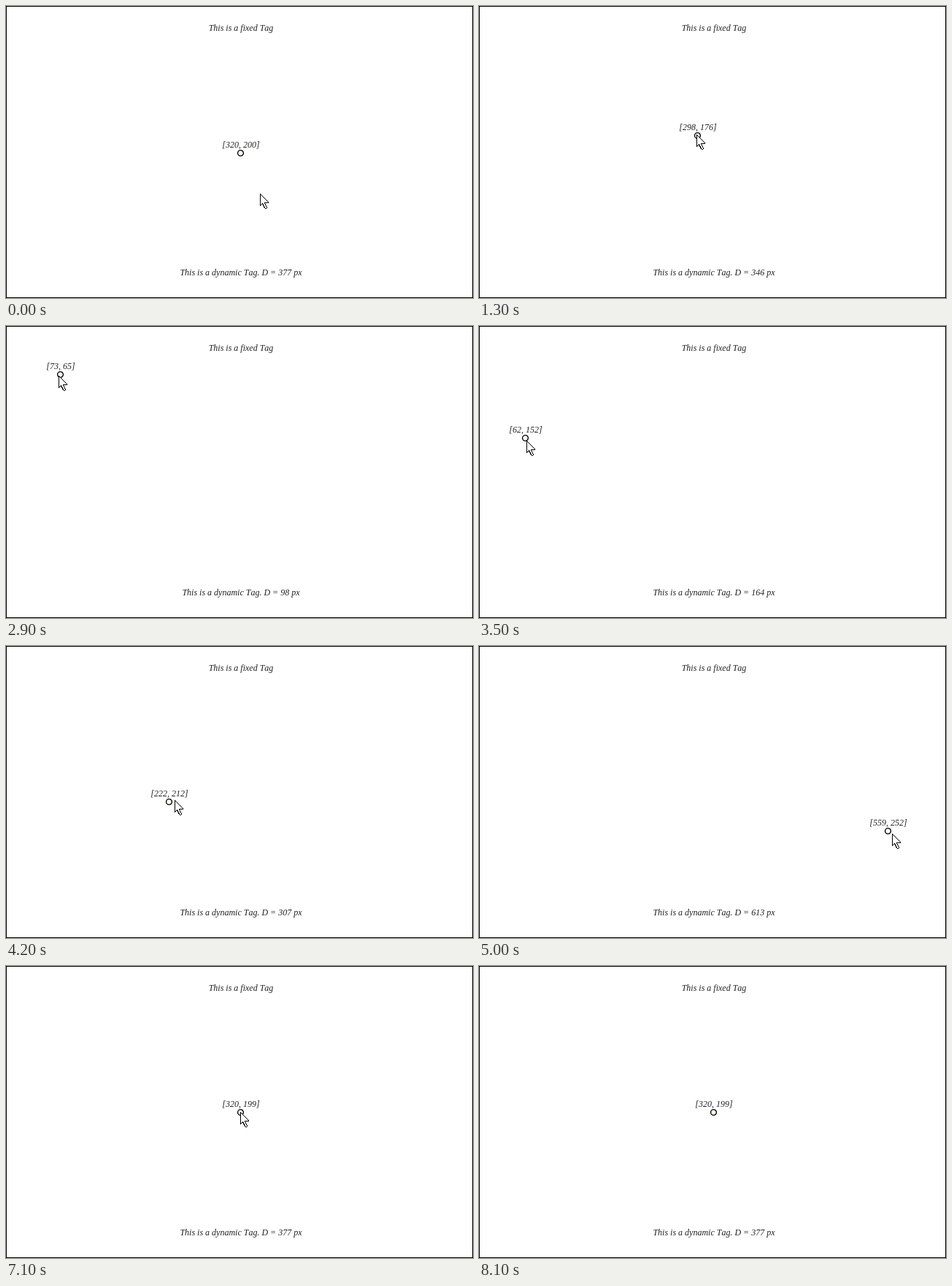
Animation of 640x400 px, one loop 9000 ms. Source, as an HTML page:

```html
<!DOCTYPE html>
<html lang="en">
<head>
<meta charset="utf-8">
<title>Draggable point with tags</title>
<style>
  html, body { margin: 0; width: 100%; height: 100%; overflow: hidden; background: #fff; }
  svg { display: block; width: 640px; height: 400px; }
  text {
    font: italic 12px "Liberation Serif", "Times New Roman", serif;
    font-kerning: none;
    text-anchor: middle;
    fill: #222;
  }
</style>
</head>
<body>
<svg viewBox="0 0 640 400">
  <rect x=".5" y=".5" width="639" height="399" fill="#fff" stroke="#000"/>
  <text x="322" y="34">This is a fixed Tag</text>
  <text id="distance" x="322" y="369"></text>
  <g id="point">
    <text id="coords" x="2" y="-6"></text>
    <circle cx="1.5" cy="1.5" r="3.9" fill="#fffff0" stroke="#000" stroke-width="1.4"/>
  </g>
  <path id="cursor" fill="#fff" stroke="#000" shape-rendering="crispEdges"
        d="M.5 .5V16.5L3.5 13.5L6.5 19.5L7.5 20.5H8.5L9.5 19.5L6.5 12.5H11.5V11.5Z"/>
</svg>
<script>
const LOOP = 9000, STEP = 100;
const ARRIVE = 700, GRAB = 900, RELEASE = 7600, GONE = 8100;

// Turning points of the figure-eight drag: time, x, y.
const turns = [
  [800, 320, 200], [1300, 298, 176], [2500, 150, 31], [2900, 73, 65],
  [3300, 53, 115], [4000, 135, 227], [4200, 222, 212], [4500, 340, 190],
  [5200, 594, 295], [5400, 551, 378], [5800, 377, 277],
  [6500, 320, 191], [6700, 320, 191], [7100, 320, 199]
];

const clamp = u => Math.min(1, Math.max(0, u));
const smooth = u => u * u * (3 - 2 * u);
const mix = (a, b, u) => a.map((v, k) => v + (b[k] - v) * u);
const rate = (a, b, axis) => (b[axis] - a[axis]) / (b[0] - a[0]);

// Harmonic mean of the neighbouring rates: flat at extremes, so no overshoot.
function slope(i, axis) {
  if (i === 0 || i === turns.length - 1) return 0;
  const p = rate(turns[i - 1], turns[i], axis);
  const q = rate(turns[i], turns[i + 1], axis);
  return p * q > 0 ? 2 * p * q / (p + q) : 0;
}

function drag(t) {
  let i = 0;
  while (i < turns.length - 2 && t >= turns[i + 1][0]) i++;
  const a = turns[i], b = turns[i + 1], span = b[0] - a[0];
  const u = clamp((t - a[0]) / span), v = 1 - u;
  return [1, 2].map(k => a[k] + (b[k] - a[k]) * smooth(u) +
    span * u * v * (v * slope(i, k) - u * slope(i + 1, k)));
}

// The pointer runs slightly ahead of the point it drags.
function pointer(t) {
  if (t < GRAB) return mix([348, 257], [320, 204], smooth(clamp(t / ARRIVE)));
  if (t > RELEASE) return mix([321, 200], [452, 388], ((t - RELEASE) / 400) ** 2);
  const before = drag(t - 10), after = drag(t + 10);
  return drag(t).map((v, k) => Math.round(v) + 1 + after[k] - before[k]);
}

const el = id => document.getElementById(id);
const [distance, coords, point, cursor] = ["distance", "coords", "point", "cursor"].map(el);
const place = (node, [x, y]) => node.setAttribute("transform", `translate(${x} ${y})`);

function draw(t) {
  const [x, y] = drag(t).map(Math.round);
  place(point, [x, y]);
  coords.textContent = `[${x}, ${y}]`;
  distance.textContent = `This is a dynamic Tag. D = ${Math.round(Math.hypot(x, y))} px`;
  place(cursor, pointer(t).map(Math.round));
  cursor.style.display = t < GONE ? "" : "none";
}

const start = performance.now();
function tick() {
  const t = (performance.now() - start) % LOOP;
  draw(Math.floor(t / STEP) * STEP);
  requestAnimationFrame(tick);
}
tick();
</script>
</body>
</html>
```
